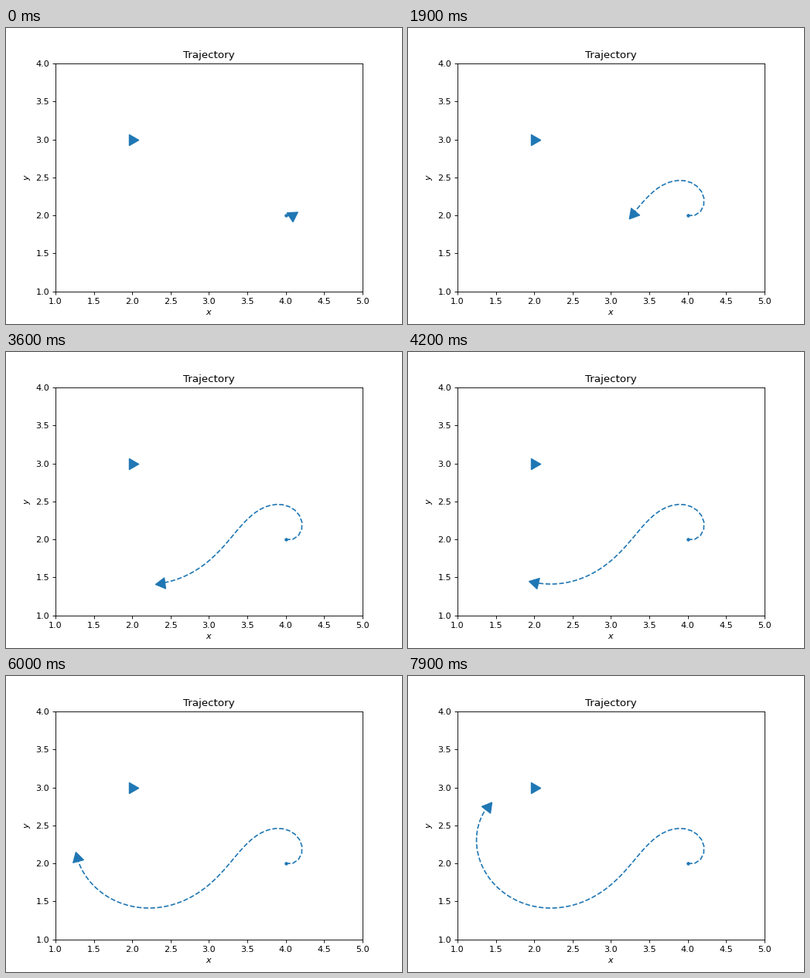
Animation, 512 px wide and 384 px high, one loop 8000 ms. Source, as a matplotlib script:

```python
import numpy as np
import matplotlib.pyplot as plt
from matplotlib.animation import FuncAnimation

STEPS = 80
DT = 0.1
START = (4.0, 2.0, 0.0)
GOAL = (2.0, 3.0, 0.0)
K_RHO, K_ALPHA, K_BETA = 0.4, 1.4, -0.8
BLUE = "#1f77b4"


def wrap(angle):
    return (angle + np.pi) % (2 * np.pi) - np.pi


def drive(pose):
    """One Euler step of the polar pose controller."""
    x, y, theta = pose
    dx, dy = GOAL[0] - x, GOAL[1] - y
    bearing = np.arctan2(dy, dx)
    alpha = wrap(bearing - theta)
    beta = wrap(GOAL[2] - bearing)
    v = K_RHO * np.hypot(dx, dy)
    omega = K_ALPHA * alpha + K_BETA * beta
    return (x + v * np.cos(theta) * DT,
            y + v * np.sin(theta) * DT,
            theta + omega * DT)


def arrow(theta):
    return (3, 0, np.degrees(theta) - 90)


poses = [START]
for _ in range(STEPS):
    poses.append(drive(poses[-1]))
poses = np.array(poses)

fig, ax = plt.subplots(figsize=(6.4, 4.8), dpi=80)
ax.set(xlim=(1, 5), ylim=(1, 4), title="Trajectory", xlabel="$x$", ylabel="$y$",
       xticks=np.arange(1, 5.1, 0.5), yticks=np.arange(1, 4.1, 0.5))

ax.plot(*START[:2], marker=".", color=BLUE)
ax.plot(*GOAL[:2], marker=arrow(GOAL[2]), markersize=15, color=BLUE)
trail, = ax.plot([], [], "--", color=BLUE)
robot, = ax.plot([], [], markersize=15, linestyle="none", color=BLUE)


def update(i):
    x, y, theta = poses[i + 1]
    trail.set_data(poses[:i + 2, 0], poses[:i + 2, 1])
    robot.set_data([x], [y])
    robot.set_marker(arrow(theta))
    return trail, robot


anim = FuncAnimation(fig, update, frames=STEPS, interval=100,
                     repeat=True, repeat_delay=0)
plt.show()
```
